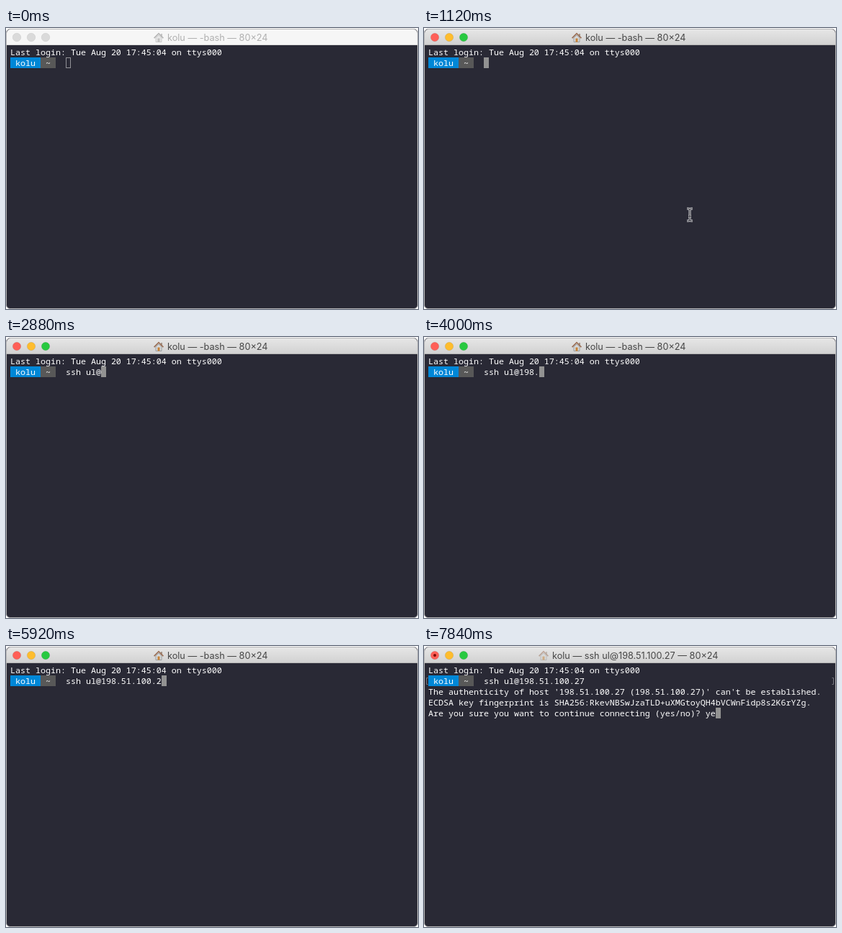
An HTML page that plays this animation: 572x392 px, repeating every 8000 ms.

```html
<!DOCTYPE html>
<html lang="en">
<head>
<meta charset="utf-8">
<title>Terminal</title>
<style>
html, body { margin: 0; width: 100%; height: 100%; overflow: hidden; background: #fff; }
svg { display: block; }
text { white-space: pre; }
.mono { font: 500 11.667px "Noto Sans Mono", monospace; fill: #fff; }
.title { font: 400 12.7px Inter, sans-serif; }
</style>
</head>
<body>
<svg id="stage" width="572" height="392" viewBox="0 0 572 392">
  <defs>
    <linearGradient id="bar" x2="0" y2="1">
      <stop stop-color="#e6e6e6"/><stop offset="1" stop-color="#d1d1d1"/>
    </linearGradient>
  </defs>
  <rect x=".5" y="1.5" width="571" height="390" rx="5" fill="#292935" stroke="#b4b4b6"/>
  <path id="top" d="M1 24V7a5 5 0 0 1 5-5H566a5 5 0 0 1 5 5V24Z"/>
  <path id="edge" d="M1 23.5H571"/>
  <g id="lights"></g>
  <circle id="dot" cx="15" cy="13" r="2" fill="#7a0c08"/>
  <g id="house">
    <path d="M3 7L7 3.5L11 7V13H3Z" fill="#d5d8da" stroke="#8f9294" stroke-width=".8"/>
    <path d="M10 1.5H12V6H10Z" fill="#a3958a"/>
    <path d="M.6 7.6L7 1.2L13.4 7.6" fill="none" stroke="#9b7058" stroke-width="1.7"/>
    <path d="M5.5 8H8.5V13H5.5Z" fill="#c98235"/>
  </g>
  <text id="title" class="title" y="18"></text>
  <path d="M6 41H48V56H6Z" fill="#0087d7"/>
  <path d="M48 41H69V56H48Z" fill="#585858"/>
  <path id="marks" d="M5.5 44.5H3.5V53.5H5.5M566.500 44.5H568.5V53.5H566.5" fill="none" stroke="#77777f"/>
  <rect id="caret"/>
  <g id="lines" class="mono"></g>
  <g id="mouse">
    <g id="ring" fill="none" stroke="#fff">
      <circle r="17.5" stroke-width="1.1"/><circle r="15.2" stroke-width="1.2"/>
    </g>
    <path id="halo" fill="none" stroke="#d8d8da" stroke-width="3"/>
    <path id="beam" fill="none" stroke="#33333c" stroke-width="1.1"/>
  </g>
</svg>
<script>
const LOOP = 8000, CELL = 7, ROW = 15, LEFT = 6, TOP = 26;
const USER = 'kolu', HOST = '198.51.100.27', LOGIN = 'ul@' + HOST;
const COMMAND = 'ssh ' + LOGIN;
const QUESTION = 'Are you sure you want to continue connecting (yes/no)? ';
const REPLY = [
  `The authenticity of host '${HOST} (${HOST})' can't be established.`,
  'ECDSA key fingerprint is SHA256:RkevNBSwJzaTLD+uXMGtoyQH4bVCWnFidp8s2K6rYZg.',
];
// One entry per typed character; equal times arrive together.
const KEYS = [2000, 2160, 2160, 2320, 2480, 2560, 2880, 3120, 3200, 3280, 4000,
  4240, 4400, 4480, 4880, 5200, 5680, 5760, 5920, 6080];
const ANSWER_KEYS = [7600, 7840];
// Pointer positions: start time, x, y.
const MOVES = [[80, 228, 330], [160, 234, 232], [240, 236, 205],
  [800, 300, 238], [880, 354, 257], [1120, 369, 260.5]];
const POINTER_END = 1200, RING = [240, 400], ACTIVE = 320, FOCUS = 400;
const ENTER = 6240, CONNECT = 6320, OUTPUT = 6400;

const $ = id => document.getElementById(id);
const set = (el, attrs) => { for (const k in attrs) el.setAttribute(k, attrs[k]); };
const show = (id, on) => set($(id), { visibility: on ? 'visible' : 'hidden' });
const add = (parent, tag, attrs) => {
  const el = document.createElementNS('http://www.w3.org/2000/svg', tag);
  set(el, attrs);
  return parent.appendChild(el);
};
const count = (times, t) => times.filter(k => k <= t).length;

const lights = ['#ff5f57', '#ffbd2e', '#28c940'].map((color, i) =>
  ({ color, el: add($('lights'), 'circle', { cx: 15 + 20 * i, cy: 13, r: 5.7, 'stroke-width': .6 }) }));
const lines = Array.from({ length: 5 }, (_, r) =>
  add($('lines'), 'text', { x: LEFT, y: TOP + ROW * r + 12 }));
for (const id of ['halo', 'beam'])
  set($(id), { d: 'M-4 -8.500H-2Q0 -8.500 0 -6.500V6.500Q0 8.500 -2 8.500H-4M4 -8.500H2Q0 -8.500 0 -6.500M0 6.500Q0 8.500 2 8.500H4M-2 2H2' });

function drawBar(t) {
  const active = t >= ACTIVE, linked = t >= CONNECT;
  set($('top'), { fill: active ? 'url(#bar)' : '#f6f6f6' });
  set($('edge'), { stroke: active ? '#b3b3b3' : '#d8d8d8' });
  for (const { color, el } of lights)
    set(el, { fill: active ? color : '#dadada', stroke: active ? 'rgba(0,0,0,.15)' : '#cccccc' });
  show('dot', linked);
  set($('house'), {
    transform: `translate(${linked ? 159 : 205} 6.5)`,
    opacity: active && !linked ? 1 : .5,
    style: active ? '' : 'filter:grayscale(1)',
  });
  set($('title'), { x: linked ? 178 : 224, fill: active ? '#464646' : '#b0b0b0' });
  $('title').textContent = `${USER} — ${linked ? 'ssh ' + LOGIN : '-bash'} — 80×24`;
}

function drawScreen(t) {
  const typed = count(KEYS, t), answered = count(ANSWER_KEYS, t);
  const prompt = ` ${USER}  ~   `;
  const out = t >= OUTPUT;
  const text = [
    'Last login: Tue Aug 20 17:45:04 on ttys000',
    prompt + COMMAND.slice(0, typed),
    ...(out ? [...REPLY, QUESTION + 'yes'.slice(0, answered)] : ['', '', '']),
  ];
  lines.forEach((el, i) => { el.textContent = text[i]; });
  show('marks', t >= ENTER);

  const row = out ? 4 : t >= ENTER ? 2 : 1;
  const x = LEFT + CELL * text[row].length, y = TOP + ROW * row;
  set($('caret'), t < FOCUS
    ? { x: x + .5, y: y + .5, width: 6, height: 14, fill: 'none', stroke: '#929297' }
    : { x, y, width: 7, height: 15, fill: '#929292', stroke: 'none' });
}

function drawPointer(t) {
  const move = MOVES.filter(m => m[0] <= t).pop();
  const on = move && t < POINTER_END;
  set($('mouse'), { display: on ? 'inline' : 'none' });
  if (on) set($('mouse'), { transform: `translate(${move[1]} ${move[2]})` });
  show('ring', t >= RING[0] && t < RING[1]);
}

function render(t) {
  drawBar(t);
  drawScreen(t);
  drawPointer(t);
}

const start = performance.now();
function tick() {
  render((performance.now() - start) % LOOP);
  requestAnimationFrame(tick);
}
render(0);
requestAnimationFrame(tick);
</script>
</body>
</html>
```
